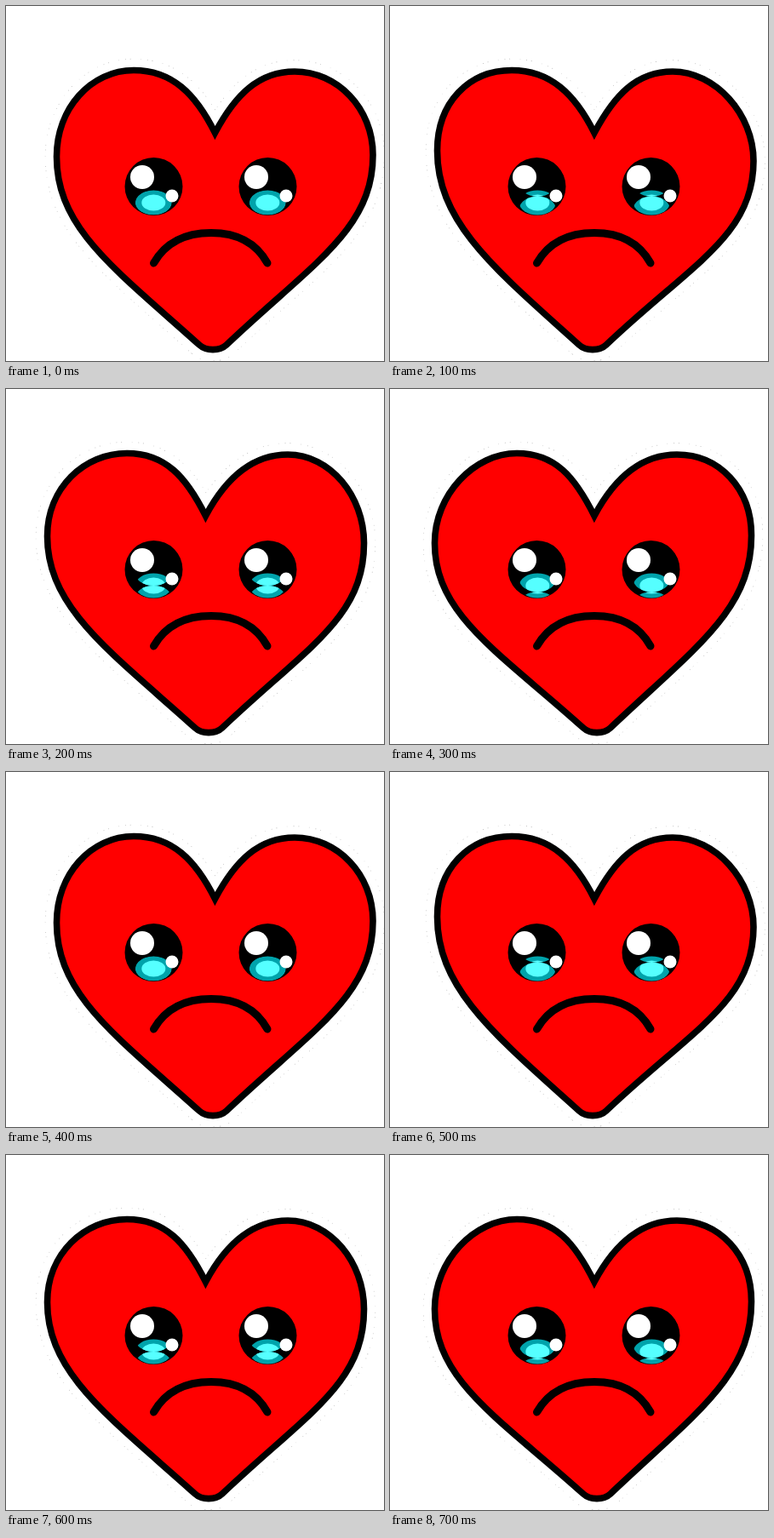
An HTML page that plays this animation: 444 px wide and 417 px high, repeating every 800 ms.

```html
<!DOCTYPE html>
<html lang="en">
<head>
<meta charset="utf-8">
<title>Sad heart</title>
<style>
  html, body { margin: 0; width: 100%; height: 100%; overflow: hidden; background: #fff; }
  svg { display: block; width: 100%; height: 100%; }
</style>
</head>
<body>
<svg viewBox="0 0 444 417">
  <defs>
    <clipPath id="tears">
      <ellipse id="tearLow" cx="173.3" rx="21.5" ry="14.5"/>
      <ellipse id="tearHigh" cx="173.3" rx="21.5" ry="14.5"/>
    </clipPath>
    <g id="eye">
      <circle class="ball" cy="212" r="34"/>
      <g clip-path="url(#tears)">
        <ellipse cx="173.3" cy="231" rx="21.5" ry="14.5" fill="#00a3ab"/>
        <ellipse cx="173.3" cy="231" rx="14" ry="9.5" fill="#55ffff"/>
      </g>
      <circle class="shine" cy="201" r="14" fill="#fff"/>
      <circle cx="195" cy="223" r="7.5" fill="#fff"/>
    </g>
    <path id="heart"/>
  </defs>
  <use href="#heart" fill="none" stroke="#bbb" stroke-width="27.4" stroke-dasharray="1 6 .6 10 1 4"/>
  <use href="#heart" fill="none" stroke="#fff" stroke-width="26.2"/>
  <use href="#heart" fill="#f00" stroke="#000" stroke-width="7.6"/>
  <use href="#eye"/>
  <use href="#eye" x="134"/>
  <path id="mouth" d="M173.5 302C189 275 214 266.5 241 266.5S292 275 307 302"
        fill="none" stroke="#000" stroke-width="9" stroke-linecap="round"/>
</svg>
<script>
const $ = id => document.getElementById(id);
const ball = document.querySelector('.ball');
const shine = document.querySelector('.shine');

const STEP = 100;
const TEAR_Y = 231, TEAR_H = 29;

// Side, lobe, notch and tip positions; shift nudges the face.
const poses = [
  { l: 59.5, ly: 177, tl: 150, n: 245.5, tr: 339, r: 431, ry: 175, b: 243, shift: 0 },
  { l: 55.5, ly: 170, tl: 143, n: 240, tr: 332, r: 427, ry: 182, b: 238, shift: 1 },
  { l: 48.5, ly: 173, tl: 142, n: 234.5, tr: 331, r: 420.5, ry: 181, b: 238, shift: 0 },
  { l: 52.5, ly: 181, tl: 149, n: 240, tr: 337, r: 424.5, ry: 172, b: 243, shift: 1 }
];

function heartPath({ l, ly, tl, n, tr, r, ry, b }) {
  return `M${n} 149
    C${n - 23} 103 ${tl + 45} 75.5 ${tl} 75.5
    C${tl - 50} 75.5 ${l} ${ly - 57} ${l} ${ly}
    C${l} ${ly + 84} ${b - 116} 308 ${b - 16} 398
    C${b - 8} 405.5 ${b + 8} 405.5 ${b + 16} 398
    C${b + 116} 303 ${r} ${ry + 88} ${r} ${ry}
    C${r} ${ry - 55} ${tr + 50} 77 ${tr} 77
    C${tr - 42} 77 ${n + 24} 104 ${n} 149Z`;
}

function draw(time) {
  const step = Math.floor(time / STEP) % poses.length;
  const pose = poses[step];
  const drop = step / poses.length * TEAR_H;
  $('heart').setAttribute('d', heartPath(pose));
  $('tearLow').setAttribute('cy', TEAR_Y + drop);
  $('tearHigh').setAttribute('cy', TEAR_Y + drop - TEAR_H);
  ball.setAttribute('cx', 173.5 - pose.shift);
  shine.setAttribute('cx', 160 - 2 * pose.shift);
  $('mouth').setAttribute('transform', `translate(${-pose.shift} 0)`);
}

const start = performance.now();
function tick() {
  draw(performance.now() - start);
  requestAnimationFrame(tick);
}
tick();
</script>
</body>
</html>
```
